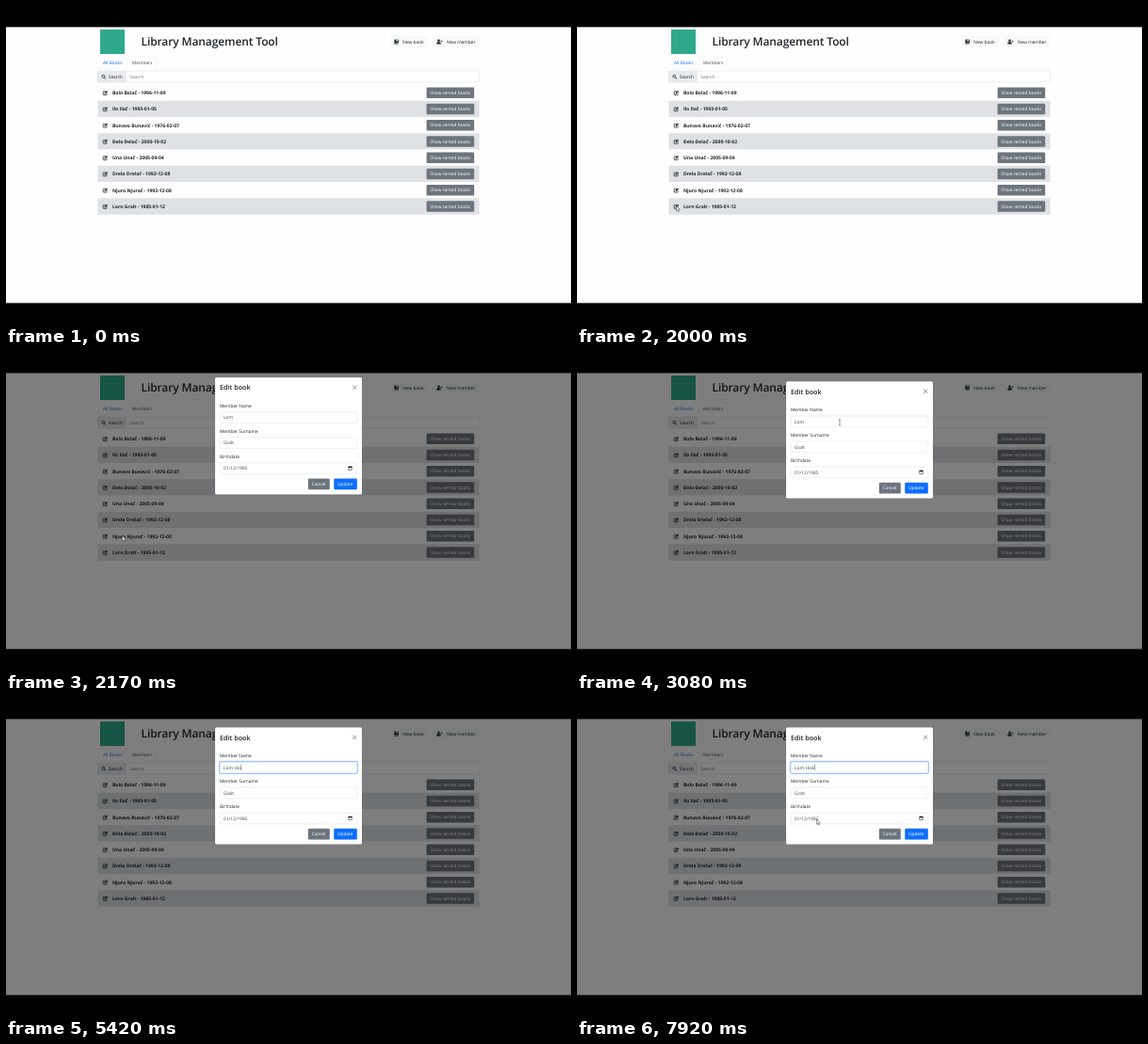
An HTML page that plays this animation: 600x338 px, repeating every 8000 ms.

```html
<!DOCTYPE html>
<html lang="en">
<head>
<meta charset="utf-8">
<title>Library Management Tool</title>
<style>
  html, body { margin: 0; width: 100%; height: 100%; overflow: hidden; background: #000; }
  svg { display: block; width: 100%; height: 100%; }
  text { font-family: "Open Sans", "Noto Sans", sans-serif; text-rendering: geometricPrecision; white-space: pre; }
</style>
</head>
<body>
<svg id="stage" viewBox="0 0 600 338"></svg>
<script>
const LOOP = 8000, FPS = 12;
const INK = '#212529', GREY = '#6c757d', BLUE = '#0d6efd', LINE = '#ced4da';

const text = (x, y, s, size = 4.8, fill = INK, weight = 400, extra = '') =>
  `<text x="${x}" y="${y}" font-size="${size}" fill="${fill}" font-weight="${weight}" ${extra}>${s}</text>`;
const rect = (x, y, w, h, fill, r = 0, extra = '') =>
  `<rect x="${x}" y="${y}" width="${w}" height="${h}" rx="${r}" fill="${fill}" ${extra}/>`;
const path = (d, extra = '') => `<path d="${d}" ${extra}/>`;
const border = (color, w = 0.35) => `stroke="${color}" stroke-width="${w}"`;
const at = (x, y, body, extra = '') => `<g transform="translate(${x} ${y})" ${extra}>${body}</g>`;

const icons = {
  search: `<circle cx="2" cy="2" r="1.5" fill="none" ${border(INK, 0.8)}/>` +
    path('M3.1 3.1L4.7 4.7', border(INK, 1)),
  edit: path('M3 .9H.9Q.4 .9 .4 1.4V4.3Q.4 4.8 .9 4.8H3.8Q4.3 4.8 4.3 4.3V3', `fill="none" ${border(INK, 0.75)}`) +
    path('M1.7 3.7L1.9 2.5L4.2 .2L5.2 1.2L2.9 3.5Z', `fill="${INK}"`),
  book: rect(0, 0, 4.4, 5, INK, 0.6) + path('M1.9 0V2.3L2.7 1.7L3.5 2.3V0Z', 'fill="#f8f9fa"') +
    path('M.8 4.1H4.4', border('#f8f9fa', 0.5)),
  user: `<circle cx="2.2" cy="1.3" r="1.3" fill="${INK}"/>` +
    path('M0 5V4.3Q0 2.9 1.5 2.9H2.9Q4.4 2.9 4.4 4.3V5Z', `fill="${INK}"`) +
    path('M5.2 1.1V3.1M4.2 2.1H6.2', border(INK, 0.6)),
  calendar: rect(0.3, 0.7, 3.6, 3.5, 'none', 0.3, border('#111', 0.5)) + rect(0.3, 0.7, 3.6, 1.1, '#111') +
    path('M1.1 0V1M3.1 0V1', border('#111', 0.5))
};

const members = [
  'Bolo Bolač - 1996-11-09', 'Ilo Ilač - 1993-01-05', 'Bunavo Bunavić - 1976-02-07',
  'Đelo Đelač - 2000-10-02', 'Una Unač - 2005-09-04', 'Drela Drelač - 1992-12-08',
  'Njuro Njurač - 1992-12-08', 'Lorn Gralt - 1985-01-12'
];

const row = (label, i) => at(97.4, 83.6 + i * 17.25,
  rect(0, 0, 405.2, 17.25, i % 2 ? '#dfe1e4' : '#fefefe') +
  path('M0 17.25H405.2', border('#dee2e6', 0.3)) +
  at(5.4, 6.2, icons.edit) +
  text(15.5, 10.5, label, 5.05, INK, 700) +
  rect(349.2, 2.9, 50.6, 11.6, GREY, 1.2) +
  text(352.9, 10.3, 'Show rented books', 4.8, '#fff'));

const page =
  rect(0, 22, 600, 294, '#fefefe') +
  rect(100, 25, 26, 26, '#2fa98c') +
  text(143.6, 41.6, 'Library Management Tool', 12, INK, 600, 'letter-spacing="-.12"') +
  rect(408, 31.8, 40, 12, '#f8f9fa', 1.2) + at(412.4, 35.4, icons.book) + text(421.3, 39.6, 'New book') +
  rect(453, 31.8, 49.5, 12, '#f8f9fa', 1.2) + at(457.3, 35.4, icons.user) + text(468, 39.6, 'New member') +
  path('M97.4 66.6H129V55.4Q129 54.2 130.2 54.2H158.8Q160 54.2 160 55.4V66.6H502.6', `fill="none" ${border('#dee2e6')}`) +
  text(103, 62.1, 'All Books', 4.8, BLUE) +
  text(134, 62.1, 'Members', 4.8, '#495057') +
  rect(97.4, 69.2, 405.2, 11.7, '#fff', 1.2, border(LINE)) +
  rect(97.4, 69.2, 30, 11.7, '#e9ecef', 1.2, border(LINE)) +
  at(101.3, 72.7, icons.search) + text(108.8, 76.9, 'Search') +
  text(131.3, 76.9, 'Search', 4.8, GREY) +
  members.map(row).join('');

const field = (y, label, value, id) =>
  text(227, y - 4.6, label) +
  rect(227.2, y, 145.6, 11.8, '#fff', 1.2, `${border(LINE)} id="${id}Box"`) +
  text(231, y + 7.7, value, 4.8, '#3a4045', 400, `id="${id}"`);

const modal =
  rect(222, 31.2, 156, 124.4, '#fff', 1.5, border('rgba(0,0,0,.2)', 0.3)) +
  text(227, 44.7, 'Edit book', 7.2, INK, 600) +
  path('M368.1 39.7L372.3 43.9M372.3 39.7L368.1 43.9', border('#6b6b6b', 0.7)) +
  rect(226.5, 67.3, 147, 13.2, 'none', 1.8, `${border('#a9caff', 1.2)} id="ring"`) +
  field(68, 'Member Name', '', 'name') +
  field(95, 'Member Surname', 'Gralt', 'surname') +
  field(122, 'Birthdate', '01/12/1985', 'birth') +
  at(363.4, 125.4, icons.calendar) +
  rect(320.8, 138.8, 23, 11.7, GREY, 1.2) + text(324.7, 146.4, 'Cancel', 4.8, '#fff') +
  rect(348.2, 138.8, 24.6, 11.7, BLUE, 1.2, 'id="update"') + text(352, 146.4, 'Update', 4.8, '#fff') +
  rect(0, 70.6, 0.4, 6.4, '#111', 0, 'id="caret"');

const arrow = path('M0 0V5.3L1.25 4.15L2.1 6.1L2.95 5.7L2.1 3.85H3.8Z',
  `fill="#fff" ${border('#222', 0.45)} stroke-linejoin="round" id="arrow"`);
const beam = path('M-1 -3.2Q0 -3.2 0 -2.6Q0 -3.2 1 -3.2M0 -2.6V2.6M-1 3.2Q0 3.2 0 2.6Q0 3.2 1 3.2',
  `fill="none" ${border('#222', 0.45)} id="beam"`);

const stage = document.getElementById('stage');
stage.innerHTML = page +
  rect(0, 22, 600, 294, '#000', 0, 'id="shade"') +
  `<g id="modal">${modal}</g><g id="pointer">${arrow}${beam}</g>` +
  rect(0, 0, 600, 22.4, '#000') + rect(0, 315.7, 600, 22.3, '#000');

const $ = id => document.getElementById(id);
const ui = {};
for (const id of ['shade', 'modal', 'ring', 'name', 'nameBox', 'update', 'caret', 'pointer', 'arrow', 'beam']) ui[id] = $(id);

// [ms, value, ...]
const opening = [[2000, 0, 0, -15.6], [2083, 0.28, 0.55, -9.2], [2167, 0.5, 1, -4.2],
  [2250, 0.5, 1, -1.3], [2333, 0.5, 1, 0]];
const moves = [[417, 377, 285], [583, 310, 250], [750, 220, 208], [917, 150, 187], [1000, 130, 186],
  [1083, 122, 195], [1167, 119, 208], [1333, 112, 214], [1500, 104.5, 217], [1833, 105.3, 212.5],
  [2083, 105.6, 212.5], [2167, 123.5, 195.5], [2333, 180, 140], [2500, 240, 102], [2750, 292, 82],
  [3000, 285, 75], [3500, 248.6, 73.6], [4500, 248.6, 73.6], [6583, 331.8, 116.3], [6833, 345, 132],
  [7083, 361, 143], [7333, 365, 140.5], [7500, 330, 138], [7750, 278, 132], [7917, 254.5, 129]];
const typing = [[3500, 'Lorn'], [4167, 'Lorn '], [4417, 'Lorn H'], [4750, 'Lorn Hi'],
  [5250, 'Lorn His'], [5667, 'Lorn Hisk']];

function sample(keys, t) {
  const n = keys.findIndex(k => k[0] > t);
  if (n === 0) return keys[0].slice(1);
  if (n < 0) return keys[keys.length - 1].slice(1);
  const a = keys[n - 1], b = keys[n], p = (t - a[0]) / (b[0] - a[0]);
  return a.slice(1).map((v, i) => v + (b[i + 1] - v) * p);
}
const show = (el, on) => el.setAttribute('visibility', on ? 'inherit' : 'hidden');

function draw(ms) {
  const t = Math.round(Math.floor((ms + 5) * FPS / 1000) * 1000 / FPS);

  const [shade, alpha, dy] = sample(opening, t);
  ui.shade.setAttribute('opacity', shade);
  ui.modal.setAttribute('opacity', alpha);
  ui.modal.setAttribute('transform', `translate(0 ${dy})`);

  const focus = t >= 3500;
  const [since, value] = typing.filter(k => k[0] <= t).pop() || typing[0];
  ui.name.textContent = value;
  show(ui.ring, focus);
  ui.nameBox.setAttribute('stroke', focus ? '#6ea6fb' : LINE);
  show(ui.caret, focus && (t - since) % 1060 < 530);
  ui.caret.setAttribute('x', 231.1 + ui.name.getComputedTextLength());

  const [x, y] = sample(moves, t);
  const inField = t >= 2917 && t < 4500;
  ui.pointer.setAttribute('transform', `translate(${x} ${y})`);
  show(ui.arrow, t >= 417 && t < 2917 || t >= 6583);
  show(ui.beam, inField);
  const hover = t > 6583 && x > 348 && x < 373 && y > 138.8 && y < 150.5;
  ui.update.setAttribute('fill', hover ? '#0b5ed7' : BLUE);
}

const start = performance.now();
function tick() {
  draw((performance.now() - start) % LOOP);
  requestAnimationFrame(tick);
}
tick();
</script>
</body>
</html>
```
